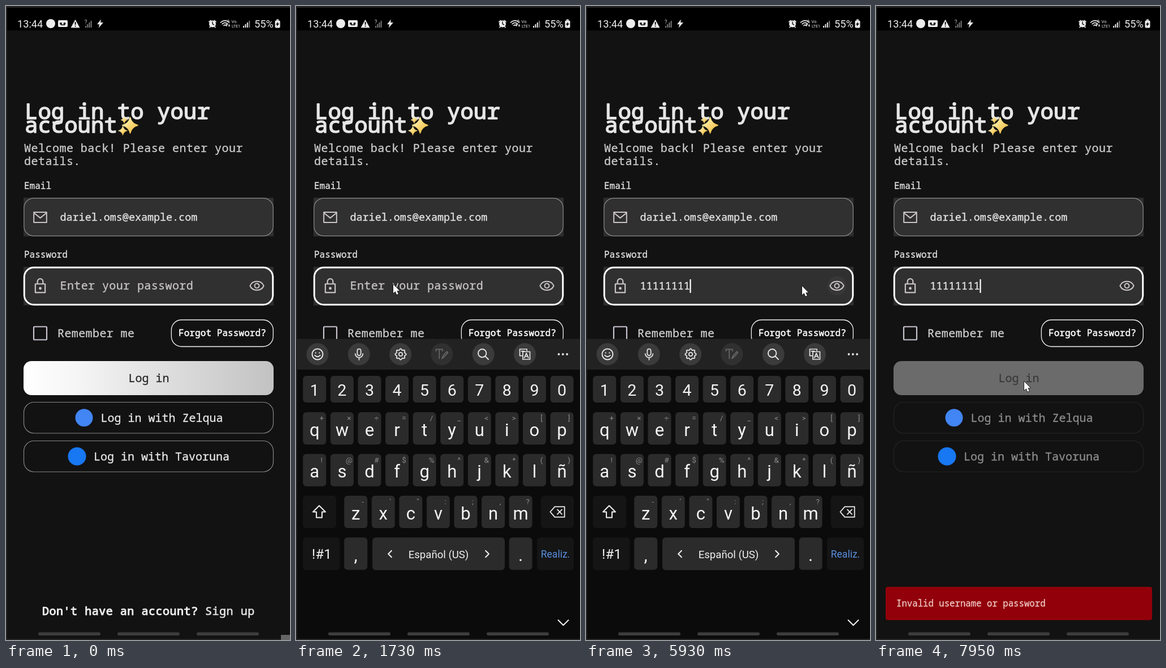
Animation of 502 by 1116 pixels, one loop 8000 ms. Source, as an HTML page with a canvas:

```html
<!DOCTYPE html>
<html lang="en">
<head>
<meta charset="utf-8">
<title>Log in</title>
<style>
  html, body { margin: 0; width: 100%; height: 100%; overflow: hidden; background: #121212; }
  canvas { display: block; width: 100vw; height: 100vh; }
</style>
</head>
<body>
<canvas id="stage"></canvas>
<script>
const W = 502, H = 1116, LOOP = 8000;
const MONO = '"Noto Sans Mono", "DejaVu Sans Mono", monospace';
const SANS = 'Roboto, "Open Sans", sans-serif';
const dpr = Math.max(1, window.devicePixelRatio || 1);

function setup(canvas) {
  canvas.width = W * dpr;
  canvas.height = H * dpr;
  const ctx = canvas.getContext('2d');
  ctx.scale(dpr, dpr);
  return ctx;
}
const stage = setup(document.getElementById('stage'));
const board = document.createElement('canvas');
let c = stage;

const clamp = v => Math.min(1, Math.max(0, v));
const smooth = p => p * p * (3 - 2 * p);

// ---- drawing helpers ----
// "heavy" thickens the strokes, for weights between regular and bold.
function text(s, x, y, size, color, { font = MONO, align = 'left', track = 0, heavy = .3 } = {}) {
  c.font = `${size}px ${font}`;
  c.letterSpacing = track + 'px';
  c.textAlign = align;
  c.fillStyle = c.strokeStyle = color;
  c.fillText(s, x, y);
  if (heavy) {
    c.lineWidth = heavy;
    c.lineJoin = 'round';
    c.strokeText(s, x, y);
  }
}
const sans = (s, x, y, size, color, align = 'center') => text(s, x, y, size, color, { font: SANS, align, heavy: 0 });

function box(x, y, w, h, r, fill, stroke, lw = 1) {
  c.beginPath();
  c.roundRect(x, y, w, h, r);
  if (fill) { c.fillStyle = fill; c.fill(); }
  if (stroke) { c.strokeStyle = stroke; c.lineWidth = lw; c.stroke(); }
}
function disc(x, y, r, fill) {
  c.beginPath();
  c.arc(x, y, r, 0, 7);
  c.fillStyle = fill;
  c.fill();
}
// Icons are paths on a 24-unit grid, centred on (x, y).
function icon(d, x, y, k, color, lw = 2) {
  const p = new Path2D(d);
  c.save();
  c.translate(x - 12 * k, y - 12 * k);
  c.scale(k, k);
  c.lineJoin = c.lineCap = 'round';
  c.strokeStyle = c.fillStyle = color;
  c.lineWidth = lw / k;
  lw ? c.stroke(p) : c.fill(p);
  c.restore();
}
function sparkle(x, y, r) {
  const g = c.createLinearGradient(x - r, y - r, x + r, y + r);
  g.addColorStop(.2, '#fff0a8');
  g.addColorStop(.8, '#f0c04a');
  c.beginPath();
  for (let i = 0; i < 4; i++) {
    const a = i * Math.PI / 2, b = a + Math.PI / 2, d = a + Math.PI / 4;
    c.lineTo(x + r * Math.cos(a), y + r * Math.sin(a));
    c.quadraticCurveTo(x + r * .26 * Math.cos(d), y + r * .26 * Math.sin(d),
                       x + r * Math.cos(b), y + r * Math.sin(b));
  }
  c.fillStyle = c.strokeStyle = g;
  c.lineWidth = r * .1;
  c.lineJoin = 'round';
  c.fill();
  c.stroke();
}

// ---- status bar ----
function statusBar() {
  const ink = '#ececec';
  c.fillStyle = '#000';
  c.fillRect(2, 3, W, 40);
  sans('13:44', 20, 37.5, 18.2, ink, 'left');
  disc(79, 31, 8, ink);
  box(92, 25, 17, 12, 2, ink);
  disc(97, 31, 2, '#111');
  disc(103.5, 31, 2, '#111');
  c.fillRect(97, 32.5, 7, 1.5);
  icon('M12 2L23 22H1z', 122.5, 31, .72, ink, 0);
  c.fillStyle = '#000';
  c.fillRect(121.7, 28, 1.8, 5);
  c.fillRect(121.7, 34.5, 1.8, 1.8);
  sans('?', 141, 32, 10, '#bbb');
  for (let i = 0; i < 4; i++) {
    c.fillStyle = '#777';
    c.fillRect(140 + i * 3.2, 35 - i * 3, 2, 3 + i * 3);
    c.fillStyle = i < 3 ? ink : '#777';
    c.fillRect(419 + i * 3.4, 35 - i * 3, 2, 3 + i * 3);
  }
  icon('M14 1L4 14h6l-2 9 12-14h-7z', 166.5, 31, .68, ink, 0);

  disc(365, 31.5, 6, ink);
  icon('M2 6l5-4M22 6l-5-4M4 22l2-3M20 22l-2-3', 365, 31.5, .62, ink, 1.6);
  icon('M12 7v6l4 2', 365, 31, .62, '#000', 1.3);
  icon('M1 9Q12-1 23 9M5 13Q12 6 19 13M9 17Q12 14 15 17', 387, 31, .68, ink, 1.7);
  sans('6', 393, 29, 8, ink);
  icon('M4 22V12M1 15l3-3 3 3M16 12v10M13 19l3 3 3-3', 393, 32, .36, ink, 1.1);
  sans('Vo', 403, 29.5, 7.5, ink);
  sans('LTE1', 406.5, 37.5, 7, ink);
  sans('55%', 439, 37.5, 18.2, ink, 'left');
  box(475.5, 25.5, 9, 13, 2, ink);
  c.fillRect(478, 23.5, 4, 2);
  icon('M14 1L4 14h6l-2 9 12-14h-7z', 480, 32, .38, '#000', 0);
}

// ---- login page ----
function field(y, border, lw) {
  c.fillStyle = '#2e2e2e';
  c.fillRect(31, y, 442, 68);
  box(31.5 + lw / 4, y + .5 + lw / 4, 441 - lw / 2, 67 - lw / 2, 17, '#303030', border, lw);
}
function page(s) {
  const soft = '#cfcfcf', pale = '#e6e6e6';
  text('Log in to your', 33, 199, 39, pale, { heavy: 1.6 });
  text('account', 33, 223, 39, pale, { heavy: 1.6 });
  sparkle(219.5, 210, 14);
  sparkle(206.5, 219.5, 8);
  sparkle(209, 200.5, 6);
  text('Welcome back! Please enter your', 32, 257, 20, soft, { track: .48 });
  text('details.', 32, 280, 20, soft, { track: .48 });

  text('Email', 32, 321.5, 16, pale);
  field(337.5, '#8a8a8a', 1.2);
  icon('M2 4h20v16H2zM2 5l10 8L22 5', 60.5, 372, 1.13, '#cac4c8');
  text('dariel.oms@example.com', 95.5, 378, 18.4, pale);

  text('Password', 32, 442.5, 16, pale);
  field(459, '#fff', 3);
  icon('M4 9h16v14H4zM7.5 9V5a4.5 4.5 0 0 1 9 0v4', 60.5, 492.5, 1.08, '#cac4c8', 2.2);
  disc(60.5, 497, 2.4, '#cac4c8');
  if (s.ripple) disc(443.5, 492.5, 17, `rgba(255,255,255,${.04 * s.ripple})`);
  icon('M1 12C5 2.6 19 2.6 23 12C19 21.4 5 21.4 1 12z', 443.5, 492.5, 1.1, '#cac4c8');
  icon('M8.4 12a3.6 3.6 0 1 0 7.2 0a3.6 3.6 0 1 0-7.2 0', 443.5, 492.5, 1.1, '#cac4c8');
  if (!s.count) text('Enter your password', 95.5, 499, 20, '#c9c4c7', { track: .4 });
  else if (s.shown) text('1'.repeat(s.count), 95.5, 499, 18.4, pale);
  else for (let i = 0; i < s.count; i++) disc(100.8 + 11.05 * i, 493, 2.6, pale);
  if (s.caret) {
    c.fillStyle = '#fff';
    c.fillRect(95 + 11.05 * s.count, 481, 2.2, 24);
  }

  box(49, 564.5, 23, 23, 1.5, null, '#cac4d0', 2.2);
  text('Remember me', 91, 582.5, 20, soft, { track: .4 });
  box(292.3, 552.5, 180, 47, 18, null, '#f4f4f4', 1.3);
  text('Forgot Password?', 305, 581, 16, '#fff', { track: .08, heavy: .5 });

  let paint = '#6b6b6b';
  if (!s.busy) {
    paint = c.createLinearGradient(31, 0, 473, 0);
    paint.addColorStop(0, '#fff');
    paint.addColorStop(.2, '#f6f6f6');
    paint.addColorStop(1, '#c2c2c2');
  }
  box(31, 625, 442, 60, 14, paint);
  text('Log in', 216.5, 662, 20, s.busy ? '#3a3a3a' : '#262626');
  social(697.5, 138, 15.5, '#4285f4', 'Log in with Zelqua', 167.5, s.busy);
  social(765.5, 125.5, 16, '#1877f2', 'Log in with Tavoruna', 155, s.busy);

  text("Don't have an account?", 64, 1071.5, 20, '#f0f0f0', { track: .53, heavy: 1 });
  text('Sign up', 352, 1071.5, 20, '#e2e2e2', { track: .53, heavy: .7 });
}
function social(y, markX, markR, mark, label, x, busy) {
  box(31.5, y, 441, 54.5, 18, null, busy ? '#242424' : '#858585', 1.2);
  disc(markX, y + 27.2, markR, mark);
  text(label, x, y + 34, 20, busy ? '#8e8e8e' : '#ececec');
}

// ---- keyboard ----
function gear(x, y) {
  c.beginPath();
  for (let a = 0; a < 6.28; a += .05) {
    const r = 8.6 + 1.1 * Math.cos(8 * a);
    c.lineTo(x + r * Math.cos(a), y + r * Math.sin(a));
  }
  c.closePath();
  c.strokeStyle = '#e4e4e4';
  c.lineWidth = 1.8;
  c.stroke();
  c.beginPath();
  c.arc(x, y, 3.2, 0, 7);
  c.stroke();
}
function key(cx, y, ch, hint, h = 57) {
  const number = h < 57;
  box(cx - 20.5, y, 41, h, 6, '#2b2b2b');
  sans(ch, cx, y + (number ? 34.5 : 41.5), number ? 28.5 : 31, '#f4f4f4');
  if (hint) sans(hint, cx + 12.5, y + 15, 13.5, '#8c8c8c');
}
function keyboard() {
  const ink = '#f0f0f0', dark = '#151515', tool = '#e4e4e4';
  c.fillStyle = '#0b0b0b';
  c.fillRect(2, 586, W, H - 586);
  c.fillStyle = '#222';
  c.fillRect(2, 586, W, 54);
  for (let i = 0; i < 6; i++) disc(38 + 73.3 * i, 613, 19.5, i === 3 ? '#303030' : '#3b3b3b');
  icon('M2 12a10 10 0 1 0 20 0a10 10 0 1 0-20 0M7 14q5 5 10 0M8.5 9v.6M15.5 9v.6', 38, 613, .95, tool);
  icon('M8.5 5a3.5 3.5 0 0 1 7 0v6a3.5 3.5 0 0 1-7 0zM4.5 11a7.5 7.5 0 0 0 15 0M12 19v4', 111.5, 613, .9, tool, 1.8);
  gear(185, 613);
  icon('M1 6V3h12v3M7 3v17M12 20l2-5 7-8 2 2-7 8z', 258, 613, .95, '#666', 1.8);
  icon('M2 10a8 8 0 1 0 16 0a8 8 0 1 0-16 0M16 16l6 6', 331, 613, .9, tool);
  icon('M16 5V2H2v13h4M8 7h14v15H8zM11 19l4-9 4 9M12.5 16h5M5 6h6', 404.5, 613, .9, tool, 1.7);
  for (let i = 0; i < 3; i++) disc(464.5 + 7.3 * i, 613, 1.9, tool);

  const col = i => 32.8 + 48.58 * i;
  [...'1234567890'].forEach((k, i) => key(col(i), 651, k, '', 47));
  [...'qwertyuiop'].forEach((k, i) => key(col(i), 715, k, '+×÷=/_<>[]'[i]));
  [...'asdfghjklñ'].forEach((k, i) => key(col(i), 788.5, k, '!@#$%^&*()'[i]));
  [...'zxcvbnm'].forEach((k, i) => key(col(i + 1.5), 862, k, '-\'":;,?'[i]));
  box(12, 862, 59, 57, 6, dark);
  icon('M12 2l10 10h-5.5v9h-9v-9H2z', 41, 890.5, 1.1, ink);
  box(433, 862, 58, 57, 6, dark);
  icon('M8 4h15v16H8L1 12zM12 8.5l7 7M19 8.5l-7 7', 462, 890.5, 1.15, ink, 1.8);

  box(12, 935.5, 65.5, 57.5, 6, dark);
  sans('!#1', 45.5, 973, 24.3, ink);
  key(col(1.5), 935.5, ',', '');
  box(135, 935.5, 234, 57.5, 6, '#2b2b2b');
  sans('Español (US)', 252, 971.5, 18.6, ink);
  icon('M16 4l-8 8 8 8', 166, 964.5, .72, ink);
  icon('M8 4l8 8-8 8', 338, 964.5, .72, ink);
  key(col(7.5), 935.5, '.', '');
  box(426, 935.5, 65, 57.5, 6, dark);
  sans('Realiz.', 458.5, 971, 17.5, '#5a8fe0');
}

// ---- timeline ----
const typed = [2070, 2270, 2430, 2560, 2730, 2900, 3170, 3870];
const moves = [
  [540, 470, 574], [1130, 172, 490], [3530, 172, 490], [3700, 254, 498],
  [4070, 254, 498], [4600, 484, 965], [4870, 440, 887], [5070, 440, 887],
  [5600, 441, 491], [5860, 441, 491], [5930, 382, 493], [6480, 285, 509],
  [6710, 285, 509], [7060, 262, 661]
];
function pointerAt(t) {
  let a = moves[0], b = a;
  for (const m of moves) {
    b = m;
    if (m[0] > t) break;
    a = m;
  }
  const p = a === b ? 0 : smooth((t - a[0]) / (b[0] - a[0]));
  return [a[1] + (b[1] - a[1]) * p, a[2] + (b[2] - a[2]) * p];
}
function caretOn(t) {
  const from = [40, ...typed].filter(k => k <= t).pop();
  return from !== undefined && (t - from) % 1000 < 500;
}
function keysAt(t) {
  if (t < 1290 || t > 6620) return null;
  if (t < 6320) {
    const p = clamp((t - 1310) / 300);
    return { dy: 156 * (1 - p) ** 2, alpha: clamp((t - 1290) / 68) };
  }
  const p = (t - 6320) / 300;
  return { dy: 140 * (1 - (1 - p) ** 3), alpha: 1 - p };
}

function snackbar(t) {
  const p = clamp((t - 7470) / 150);
  if (!p) return;
  const k = .8 + .2 * (1 - (1 - p) ** 2);
  c.save();
  c.globalAlpha = p;
  c.translate(252.5, 1052);
  c.scale(k, k);
  c.translate(-252.5, -1052);
  box(17, 1022.5, 471, 58.5, 4, '#92000a');
  text('Invalid username or password', 36, 1057, 15.7, '#f0c9c6');
  c.restore();
}
function pointer(t) {
  if (t < 540) return;
  const [x, y] = pointerAt(t);
  c.save();
  c.translate(x, y);
  const p = new Path2D('M0 0V15.5L3.6 12.2L6 18L8.8 16.8L6.4 11.2H11z');
  c.lineWidth = 1.6;
  c.lineJoin = 'round';
  c.strokeStyle = '#111';
  c.stroke(p);
  c.fillStyle = '#fff';
  c.fill(p);
  c.restore();
}

function draw(t) {
  c.fillStyle = '#121212';
  c.fillRect(0, 0, W, H);
  page({
    count: typed.filter(k => k <= t).length,
    shown: t >= 5700,
    caret: caretOn(t),
    busy: t >= 7240,
    ripple: t < 5620 ? 0 : clamp((t - 5620) / 80) * clamp((6060 - t) / 140)
  });
  const k = keysAt(t);
  if (k) {
    c.globalAlpha = k.alpha;
    c.drawImage(board, 0, k.dy, W, H);
    c.globalAlpha = 1;
  }
  if (t >= 1320 && t < 6350) icon('M2 7l10 10L22 7', 472.5, 1085.5, .9, '#f4f4f4');
  snackbar(t);
  for (let i = 0; i < 3; i++) box(57 + 140 * i, 1102.5, 110, 5.5, 2.7, '#3d3d3d');
  statusBar();
  c.fillStyle = '#242424';
  c.fillRect(0, 0, W, 3);
  c.fillRect(0, 0, 2, H);
  c.fillRect(0, H - 2, W, 2);
  if (t < 40) box(486, 1107, 16, 9, 0, '#666');
  pointer(t);
}

c = setup(board);
keyboard();
c = stage;

const start = performance.now();
function tick() {
  draw((performance.now() - start) % LOOP);
  requestAnimationFrame(tick);
}
tick();
</script>
</body>
</html>
```
